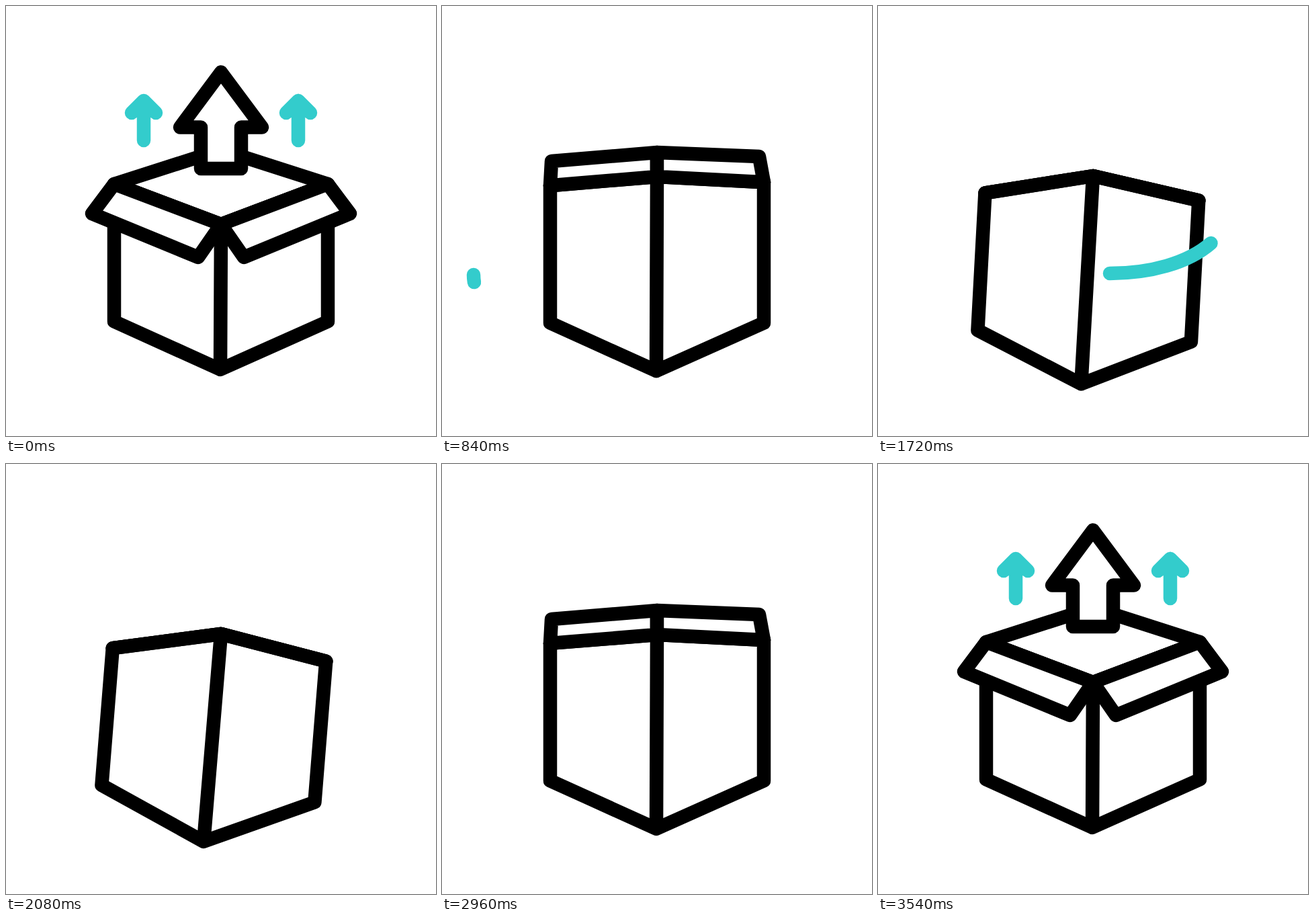
These frames come from a looping animation (640 px wide and 640 px high, 3.56 s). An HTML page:

```html
<!DOCTYPE html>
<html lang="en">
<head>
<meta charset="utf-8">
<title>Box</title>
<style>
  html, body { margin: 0; width: 100%; height: 100%; overflow: hidden; background: #fff; }
  svg { display: block; width: 100vw; height: 100vh; }
  path { stroke-width: 20.5; stroke-linecap: round; stroke-linejoin: round; }
  .ink { fill: #fff; stroke: #000; }
  .teal { fill: none; stroke: #3cc; }
</style>
</head>
<body>
<svg viewBox="0 0 640 640">
  <g id="box">
    <path id="rim" class="ink"/>
    <g id="arrows">
      <path id="main" class="ink" d="M320 98.500L381 180.500H350V242H290V180.500H259Z"/>
      <g id="side">
        <path class="teal" d="M205 200V141M187 159L205 141L223 159"/>
        <path class="teal" d="M435 200V141M417 159L435 141L453 159"/>
      </g>
    </g>
    <path id="body" class="ink"/>
    <path id="leftFlap" class="ink"/>
    <path id="rightFlap" class="ink"/>
  </g>
</svg>
<script>
const LOOP = 3560;
const $ = id => document.getElementById(id);

// Ly Fy Ry By | left flap outer, inner | right flap outer, inner | bottom y
const open = [265, 325, 265, 214, 128, 309, 286, 374, 512, 309, 354, 374, 541];
const flat = [237, 241, 237, 225, 128, 281, 312, 294, 514, 284, 327, 294, 512];
const wide = [240, 240, 238, 236, 123, 246, 316, 258, 516, 248, 324, 258, 518];
const up = [267, 254, 262, 254, 163, 231, 320, 218, 472, 224, 320, 218, 543];
const shut = [287, 253, 281, 253, 161, 287, 320, 253, 479, 281, 320, 253, 563];

const poses = [
  [220, open], [540, flat], [690, wide], [840, up], [980, shut],
  [2700, shut], [2960, up], [3080, wide], [3200, flat], [3520, open]
];
const tilt = [
  [892, 0], [1160, -2.9], [1428, -6], [1720, 3.05],
  [1820, 5.7], [1864, 6], [2420, 0.9], [2620, 0]
];
const rise = [[3180, 200], [3440, 35], [3520, 0]];

// Strokes drawn from tail to head, both in path length
const strokes = [
  {
    d: "M47 400C47 440 85 485 137 505Q195 525 249 505",
    head: [[800, 0], [1130, 262]],
    tail: [[900, 0], [1160, 146], [1300, 262]]
  },
  {
    d: "M317 236V223C317 175 531 185 531 277C531 300 525 318 512 335C482 377 415 398 345 398",
    head: [[1120, 0], [1160, 13], [1280, 90], [1700, 547]],
    tail: [[1280, 0], [1720, 362], [1860, 547]]
  },
  {
    d: "M188 446L282 485",
    head: [[2220, 0], [2400, 102]],
    tail: [[2430, 0], [2600, 102]]
  },
  {
    d: "M350 488L446 457",
    head: [[2220, 0], [2400, 101]],
    tail: [[2430, 0], [2600, 101]]
  }
];

for (const s of strokes) {
  s.el = document.createElementNS("http://www.w3.org/2000/svg", "path");
  s.el.setAttribute("class", "teal");
  s.el.setAttribute("d", s.d);
  document.querySelector("svg").append(s.el);
}

// Smooth interpolation through keys without overshoot
function track(keys, t, pick = v => v) {
  const n = keys.length - 1;
  if (t <= keys[0][0]) return pick(keys[0][1]);
  if (t >= keys[n][0]) return pick(keys[n][1]);
  let i = 0;
  while (t > keys[i + 1][0]) i++;
  const slope = k => k < 0 || k >= n ? 0
    : (pick(keys[k + 1][1]) - pick(keys[k][1])) / (keys[k + 1][0] - keys[k][0]);
  const tangent = k => {
    const a = slope(k - 1), b = slope(k);
    return a * b > 0 ? 2 * a * b / (a + b) : 0;
  };
  const h = keys[i + 1][0] - keys[i][0], u = (t - keys[i][0]) / h;
  const a = pick(keys[i][1]), b = pick(keys[i + 1][1]);
  const e = u * u * (3 - 2 * u);
  return a + (b - a) * e
    + h * u * (1 - u) * ((1 - u) * tangent(i) - u * tangent(i + 1));
}

const poly = (...pts) => "M" + pts.map(p => p.join(" ")).join("L") + "Z";
const setPath = (id, d) => $(id).setAttribute("d", d);
const shift = (id, y) => $(id).setAttribute("transform", `translate(0 ${y})`);

function drawBox(t) {
  const [ly, fy, ry, by, ax, ay, bx, b2, cx, cy, dx, dy, my] =
    open.map((_, i) => track(poses, t, p => p[i]));
  const L = [161, ly], F = [320, fy], R = [479, ry], M = [319, my];
  const base = ly + 204.5;
  setPath("rim", poly(L, [320, by], R, F));
  setPath("body", poly(L, F, R, [479, base], M, [161, base]) + `M${F}L${M}`);
  setPath("leftFlap", poly(L, [ax, ay], [bx, b2], F));
  setPath("rightFlap", poly(R, [cx, cy], [dx, dy], F));
  $("box").setAttribute("transform", `rotate(${track(tilt, t)} 320 253)`);
}

function drawArrows(t) {
  const leaving = t < 740;
  $("arrows").style.display = leaving || t > 3180 ? "" : "none";
  const p = Math.max(0, (t - 220) / 520) ** 3;
  const y = track(rise, t);
  shift("main", leaving ? -258 * p : y);
  shift("side", leaving ? -241 * p : y);
}

function drawStroke(s, t) {
  const head = track(s.head, t), tail = track(s.tail, t);
  s.el.style.display = head - tail > 0.5 ? "" : "none";
  s.el.style.strokeDasharray = `${Math.max(0, head - tail)} 2000`;
  s.el.style.strokeDashoffset = -tail;
}

const start = performance.now();
function frame() {
  const t = (performance.now() - start) % LOOP;
  drawBox(t);
  drawArrows(t);
  strokes.forEach(s => drawStroke(s, t));
  requestAnimationFrame(frame);
}
frame();
</script>
</body>
</html>
```
